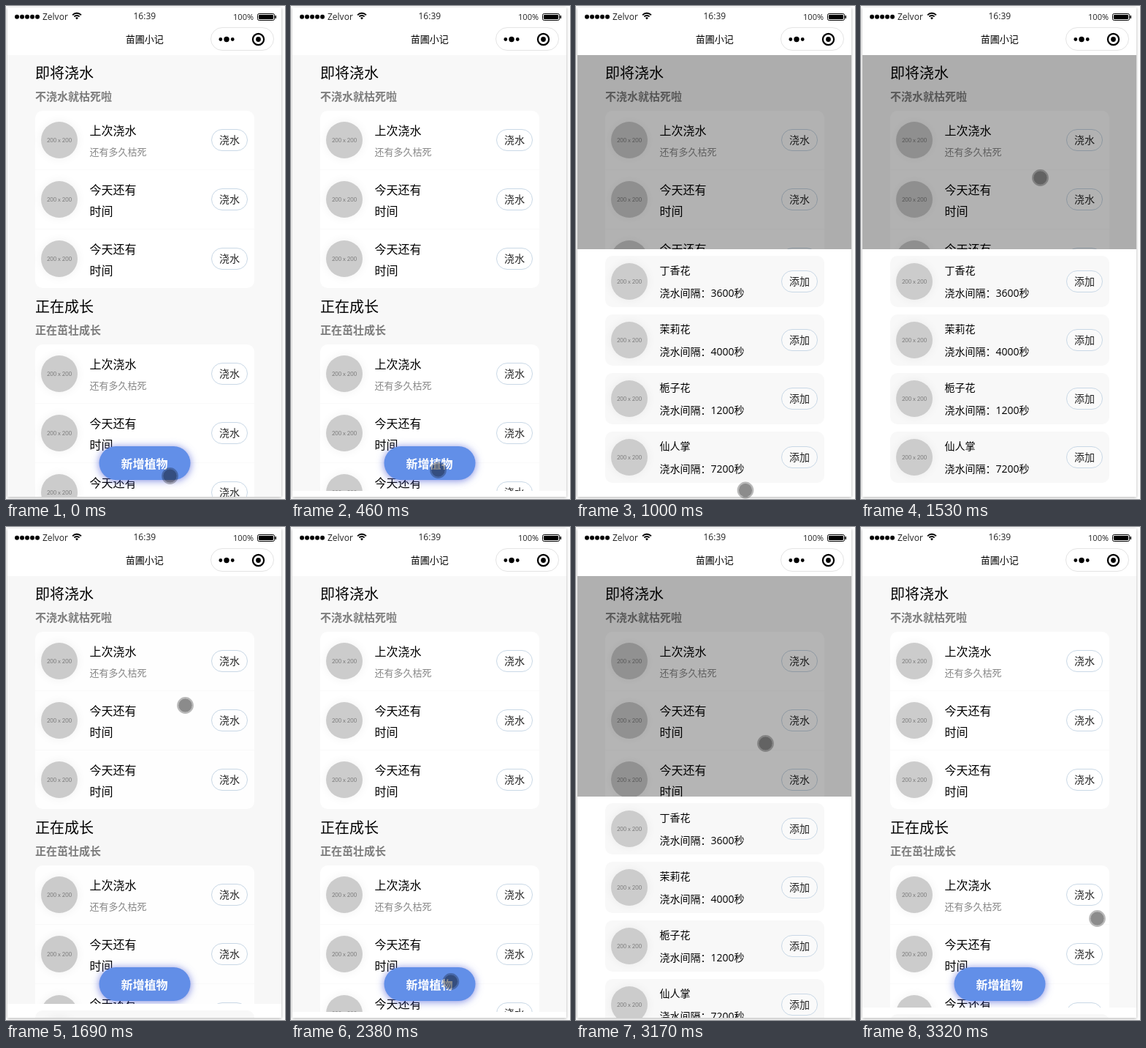
Recreate the animation shown at these times as an HTML page with a canvas. Size 382 by 673 pixels, loop 3.4 s.

```html
<!DOCTYPE html>
<html lang="zh-CN">
<head>
<meta charset="utf-8">
<title>苗圃小记</title>
<style>
html, body { margin: 0; width: 100%; height: 100%; overflow: hidden; background: #fff; }
canvas { display: block; width: 382px; height: 673px; }
</style>
</head>
<body>
<canvas id="stage"></canvas>
<script>
const W = 382, H = 673, LOOP = 3400, STEP = 77, LAST = 43;
const SHEET_OPEN = 332, SHEET_SHUT = 670;
const FONT = '"Open Sans", "Noto Sans CJK SC", "Noto Sans CJK", sans-serif';
const canvas = document.getElementById('stage');
const ratio = window.devicePixelRatio || 1;
canvas.width = W * ratio;
canvas.height = H * ratio;
const ctx = canvas.getContext('2d');

// Pointer path: [step, x, y]
const PATH = [
  [0, 224.5, 641.5], [2, 201.5, 633.5], [11, 201.5, 633.5], [13, 232, 661], [15, 276, 560],
  [18, 262, 276], [20, 245.5, 234.5], [22, 245.5, 243.5], [25, 303, 575], [27, 255, 650],
  [29, 208, 630], [30, 208, 630], [33, 240.5, 601.5], [37, 240.5, 601.5],
  [40, 259.5, 298], [41, 259.5, 295.5], [43, 323.5, 534.5]
];

// Sheet moves: start and length in steps, and whether it ends up open
const MOVES = [
  { at: 5.88, len: 3, open: 1 },
  { at: 20, len: 2.83, open: 0 },
  { at: 30.88, len: 3, open: 1 },
  { at: 40.66, len: 3.14, open: 0 }
];

const PLANTS = [['丁香花', 3600], ['茉莉花', 4000], ['栀子花', 1200], ['仙人掌', 7200]];

// CSS "ease" curve
function ease(x) {
  if (x <= 0) return 0;
  if (x >= 1) return 1;
  const bez = (a, b, s) => 3 * a * (1 - s) ** 2 * s + 3 * b * (1 - s) * s * s + s ** 3;
  let lo = 0, hi = 1;
  for (let i = 0; i < 24; i++) {
    const mid = (lo + hi) / 2;
    if (bez(.25, .25, mid) < x) lo = mid; else hi = mid;
  }
  return bez(.1, 1, lo);
}

const smooth = p => p * p * (3 - 2 * p);

function openness(step) {
  let amount = 0;
  for (const m of MOVES) {
    if (step < m.at) break;
    const p = ease((step - m.at) / m.len);
    amount = m.open ? p : 1 - p;
  }
  return amount;
}

function pointerAt(step) {
  let i = 1;
  while (i < PATH.length - 1 && PATH[i][0] < step) i++;
  const [s0, x0, y0] = PATH[i - 1], [s1, x1, y1] = PATH[i];
  const p = (step - s0) / (s1 - s0);
  return [x0 + (x1 - x0) * p, y0 + (y1 - y0) * p];
}

function rect(x, y, w, h, color) {
  ctx.fillStyle = color;
  ctx.fillRect(x, y, w, h);
}

function pill(x, y, w, h, r, fill, line) {
  ctx.beginPath();
  ctx.roundRect(x, y, w, h, r);
  if (fill) { ctx.fillStyle = fill; ctx.fill(); }
  if (line) { ctx.strokeStyle = line; ctx.lineWidth = 1; ctx.stroke(); }
}

function disc(x, y, r, color) {
  ctx.beginPath();
  ctx.arc(x, y, r, 0, Math.PI * 2);
  ctx.fillStyle = color;
  ctx.fill();
}

function ring(x, y, r, width, color, from = 0, to = Math.PI * 2) {
  ctx.beginPath();
  ctx.arc(x, y, r, from, to);
  ctx.lineWidth = width;
  ctx.strokeStyle = color;
  ctx.stroke();
}

// y is the vertical middle of the glyphs
function text(str, x, y, size, color = '#000', opt = {}) {
  ctx.font = `${opt.weight || 400} ${size}px ${opt.family || FONT}`;
  ctx.textAlign = opt.align || 'left';
  ctx.fillStyle = color;
  ctx.fillText(str, x, Math.round(y + size * .38));
}

function withShadow(color, blur, dy, draw) {
  ctx.save();
  ctx.shadowColor = color;
  ctx.shadowBlur = blur * ratio;
  ctx.shadowOffsetY = dy * ratio;
  draw();
  ctx.restore();
}

function avatar(y) {
  withShadow('rgba(0,0,0,.06)', 14, 0, () => disc(73, y, 25, '#ccc'));
  text('200 x 200', 73, y, 7.6, '#7c7c7c', { align: 'center', family: 'Lato, sans-serif' });
}

function outlineButton(label, y, fill) {
  pill(281.5, y - 14.5, 49, 29, 14.5, fill, '#c9d8e6');
  text(label, 306, y, 14, '#222', { align: 'center' });
}

function section(top, title, note) {
  text(title, 40, top, 20);
  text(note, 40, top + 32.5, 15, '#7c7c7c', { weight: 600 });
  pill(40, top + 52, 300, 242, 10, '#fff');
  for (let i = 0; i < 3; i++) {
    const y = top + 92 + i * 81;
    if (i) rect(40, y - 41, 300, 1, '#fafafa');
    avatar(y);
    text(i ? '今天还有' : '上次浇水', 114.5, y - 13.5, 16);
    if (i) text('时间', 114.5, y + 15.5, 16);
    else text('还有多久枯死', 114.5, y + 16.5, 13, '#888');
    outlineButton('浇水', y, '#fff');
  }
}

function addButton() {
  withShadow('rgba(80,95,215,.75)', 11, 1, () => pill(127.5, 601, 125, 46, 23, '#628fe8'));
  text('新增植物', 189.5, 625, 16, '#fff', { align: 'center', weight: 700 });
}

function sheet(top) {
  rect(2, top, 375, H - top, '#fff');
  PLANTS.forEach(([name, seconds], i) => {
    const y = top + 9 + i * 80;
    pill(40, y, 300, 70, 10, '#f8f8f8');
    avatar(y + 35);
    text(name, 114.5, y + 19.3, 14);
    text(`浇水间隔：${seconds}秒`, 114.5, y + 50.3, 14);
    outlineButton('添加', y + 35, '#fafafa');
  });
}

function header() {
  rect(2, 2, 375, 65, '#fff');
  for (let i = 0; i < 5; i++) disc(15 + i * 7, 14.8, 3, '#000');
  text('Zelvor', 50, 14, 12, '#222');
  // wifi
  const up = -Math.PI / 2;
  for (const r of [8.2, 5]) ring(97, 18, r, 1.9, '#000', up - .8, up + .8);
  ctx.beginPath();
  ctx.moveTo(97, 18.6);
  ctx.arc(97, 18, 2.6, up - .8, up + .8);
  ctx.fillStyle = '#000';
  ctx.fill();
  text('16:39', 189.8, 13.8, 12, '#222', { align: 'center' });
  text('100%', 339, 14.8, 11, '#222', { align: 'right' });
  // battery
  pill(344.5, 10.5, 23, 9, 2, null, '#000');
  pill(346, 12, 20, 6, 1, '#000');
  rect(368.5, 13, 1.5, 4, '#000');
  text('苗圃小记', 189.7, 45.5, 13, '#000', { align: 'center' });
  // capsule menu
  pill(280.5, 29.5, 86, 31, 15.5, '#fff', '#e4e4e4');
  disc(293.8, 45.5, 2.4, '#000');
  disc(302, 45.5, 3.7, '#000');
  disc(310.2, 45.5, 2.4, '#000');
  ring(345.5, 45.5, 7.6, 2.2, '#000');
  disc(345.5, 45.5, 3.4, '#000');
}

function pointer(x, y) {
  disc(x, y, 9.2, 'rgba(0,0,0,.45)');
  ring(x, y, 10.3, 2.2, 'rgba(0,0,0,.27)');
}

function draw(step) {
  const open = openness(step);
  ctx.setTransform(ratio, 0, 0, ratio, 0, 0);
  rect(0, 0, W, H, '#fff');
  withShadow('rgba(0,0,0,.32)', 4, 1, () => rect(2, 2, 375, 668, '#f8f8f8'));

  ctx.save();
  ctx.beginPath();
  ctx.rect(2, 2, 375, 668);
  ctx.clip();
  section(91, '即将浇水', '不浇水就枯死啦');
  section(410, '正在成长', '正在茁壮成长');
  addButton();
  if (open > 0) {
    rect(2, 67, 375, 603, `rgba(0,0,0,${.3 * smooth(open)})`);
    sheet(Math.round(SHEET_SHUT + (SHEET_OPEN - SHEET_SHUT) * open));
  }
  header();
  ctx.restore();

  pointer(...pointerAt(step));
}

function tick() {
  const t = performance.now() % LOOP;
  draw(Math.min(LAST, Math.floor((t + 15) / STEP)));
  requestAnimationFrame(tick);
}
tick();
</script>
</body>
</html>
```
